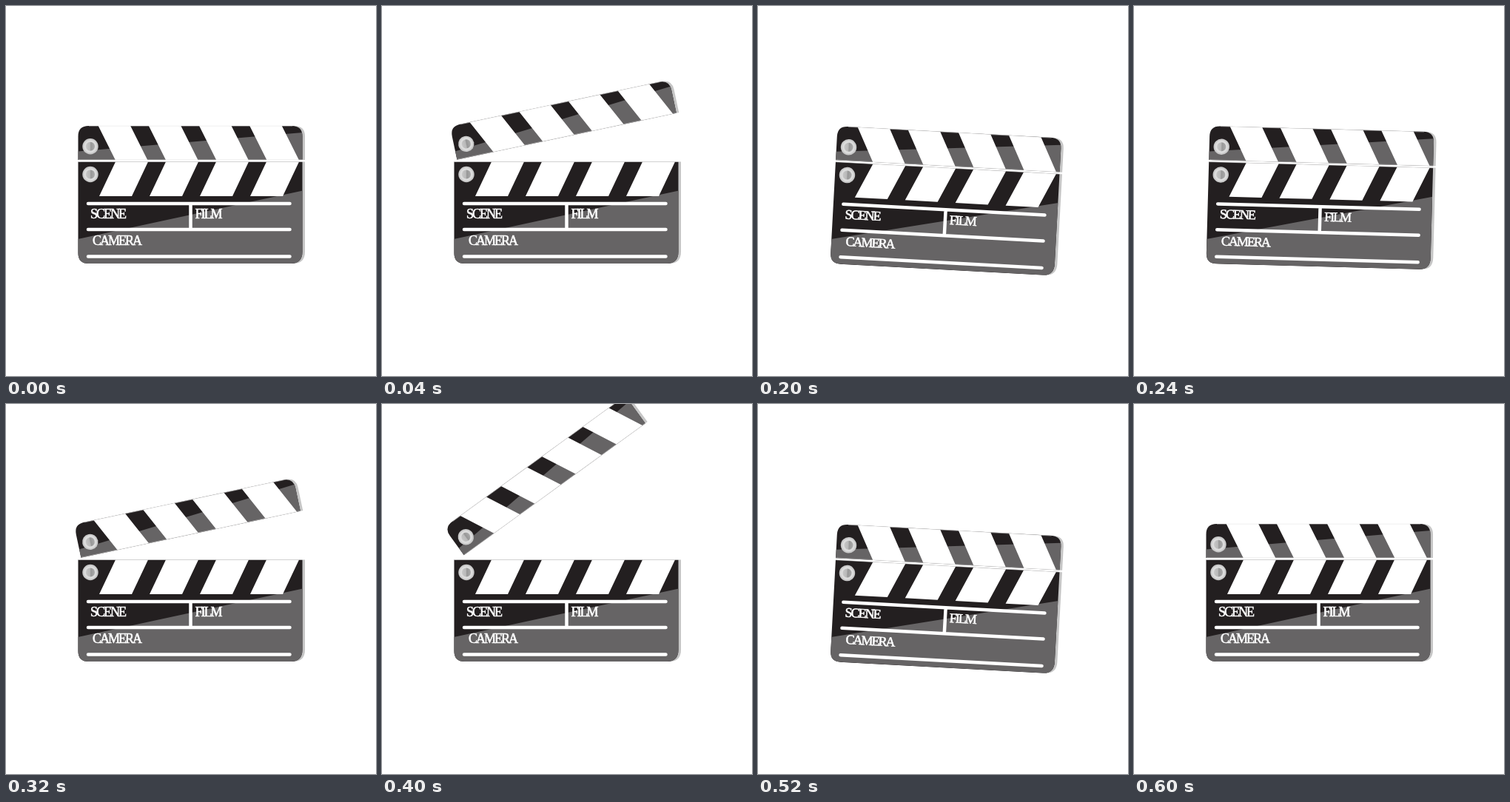
Recreate the animation shown at these times as an HTML page. Size 500 px wide and 500 px high, loop 2.4 s.

```html
<!DOCTYPE html>
<html lang="en">
<head>
<meta charset="utf-8">
<title>Clapperboard</title>
<style>
  html, body { margin: 0; width: 100%; height: 100%; overflow: hidden; background: #fff; }
  svg { display: block; width: 100vw; height: 100vh; }
  text {
    font: 18px "Liberation Serif", "Times New Roman", serif;
    letter-spacing: -2px; fill: #fff; stroke: #fff; stroke-width: .6;
  }
</style>
</head>
<body>
<svg viewBox="0 0 500 500">
  <defs>
    <linearGradient id="metal">
      <stop offset="0" stop-color="#c6c6c6"/>
      <stop offset=".45" stop-color="#b8b8b8"/>
      <stop offset=".55" stop-color="#979797"/>
      <stop offset="1" stop-color="#aaa"/>
    </linearGradient>
    <path id="armShape" d="M97.500 208V176Q97.500 162 111.500 162H386Q400.500 162 400.500 176V208Z"/>
    <path id="baseShape" d="M97.500 210.500H400.500V332Q400.500 348 385 348H111.500Q97.500 348 97.500 334Z"/>
    <clipPath id="armClip"><use href="#armShape"/></clipPath>
    <clipPath id="baseClip"><use href="#baseShape"/></clipPath>
    <g id="peg">
      <circle r="10.7" fill="#c9c9c9"/>
      <circle r="8.8" fill="#dcdcdc"/>
      <circle r="6" fill="url(#metal)"/>
    </g>
  </defs>
  <g id="board">
    <g id="base">
      <use href="#baseShape" x="3.5" fill="#c6c6c6"/>
      <use href="#baseShape" fill="#231f20"/>
      <path d="M97 315L401 249.500V348H97Z" fill="#666465" clip-path="url(#baseClip)"/>
      <path id="baseStripes" fill="#fff"/>
      <path d="M98 210.500H404" stroke="#ddd" stroke-width=".6"/>
      <path d="M111 267H383.500M111 302H383.500M111 338.500H383.500M249.500 267V302"
            stroke="#fff" stroke-width="4.5" stroke-linecap="round"/>
      <text x="114" y="286.500">SCENE</text>
      <text x="255.500" y="286.500">FILM</text>
      <text x="117" y="323">CAMERA</text>
      <use href="#peg" x="114" y="227.500"/>
    </g>
    <g id="arm">
      <use href="#armShape" x="3.5" fill="#c6c6c6"/>
      <use href="#armShape" fill="#231f20"/>
      <path d="M97 196.500L401 171V208H97Z" fill="#666465" clip-path="url(#armClip)"/>
      <path id="armStripes" fill="#fff"/>
      <path d="M112 162.200H387M98 207.800H402" stroke="#ddd" stroke-width=".5"/>
      <use href="#peg" x="114" y="189.700"/>
    </g>
  </g>
</svg>
<script>
  const LOOP = 2400, STEP = 40;
  const get = id => document.getElementById(id);

  // Four slanted bars between two heights
  function stripes(id, yTop, yBottom, top, bottom, width, pitch) {
    let d = "";
    for (let i = 0; i < 4; i++) {
      const a = top + i * pitch, b = bottom + i * pitch;
      d += `M${a} ${yTop}H${a + width}L${b + width} ${yBottom}H${b}Z`;
    }
    get(id).setAttribute("d", d);
  }
  stripes("armStripes", 162, 208, 124.7, 147.7, 43.5, 68.2);
  stripes("baseStripes", 210.5, 257, 148, 126, 44, 68);

  const liftKeys = [[0, 0], [120, 1], [200, 0], [280, 0], [400, 1], [520, 0]];
  const tiltKeys = [[160, 0], [200, 1], [280, 0], [480, 0], [520, 1], [600, 0]];

  function valueAt(keys, t) {
    if (t <= keys[0][0]) return keys[0][1];
    for (let i = 1; i < keys.length; i++) {
      const [t0, v0] = keys[i - 1], [t1, v1] = keys[i];
      if (t <= t1) return v0 + (v1 - v0) * (t - t0) / (t1 - t0);
    }
    return keys[keys.length - 1][1];
  }

  function draw(time) {
    const t = Math.floor((time % LOOP) / STEP) * STEP;
    const lift = valueAt(liftKeys, t), tilt = valueAt(tiltKeys, t);
    get("arm").setAttribute("transform",
      `translate(${-0.5 * lift} ${-10 * lift}) rotate(${-36 * lift} 114 190)`);
    get("board").setAttribute("transform", `rotate(${3.1 * tilt} 98 348)`);
  }

  const start = performance.now();
  function tick() {
    draw(performance.now() - start);
    requestAnimationFrame(tick);
  }
  draw(0);
  requestAnimationFrame(tick);
</script>
</body>
</html>
```
